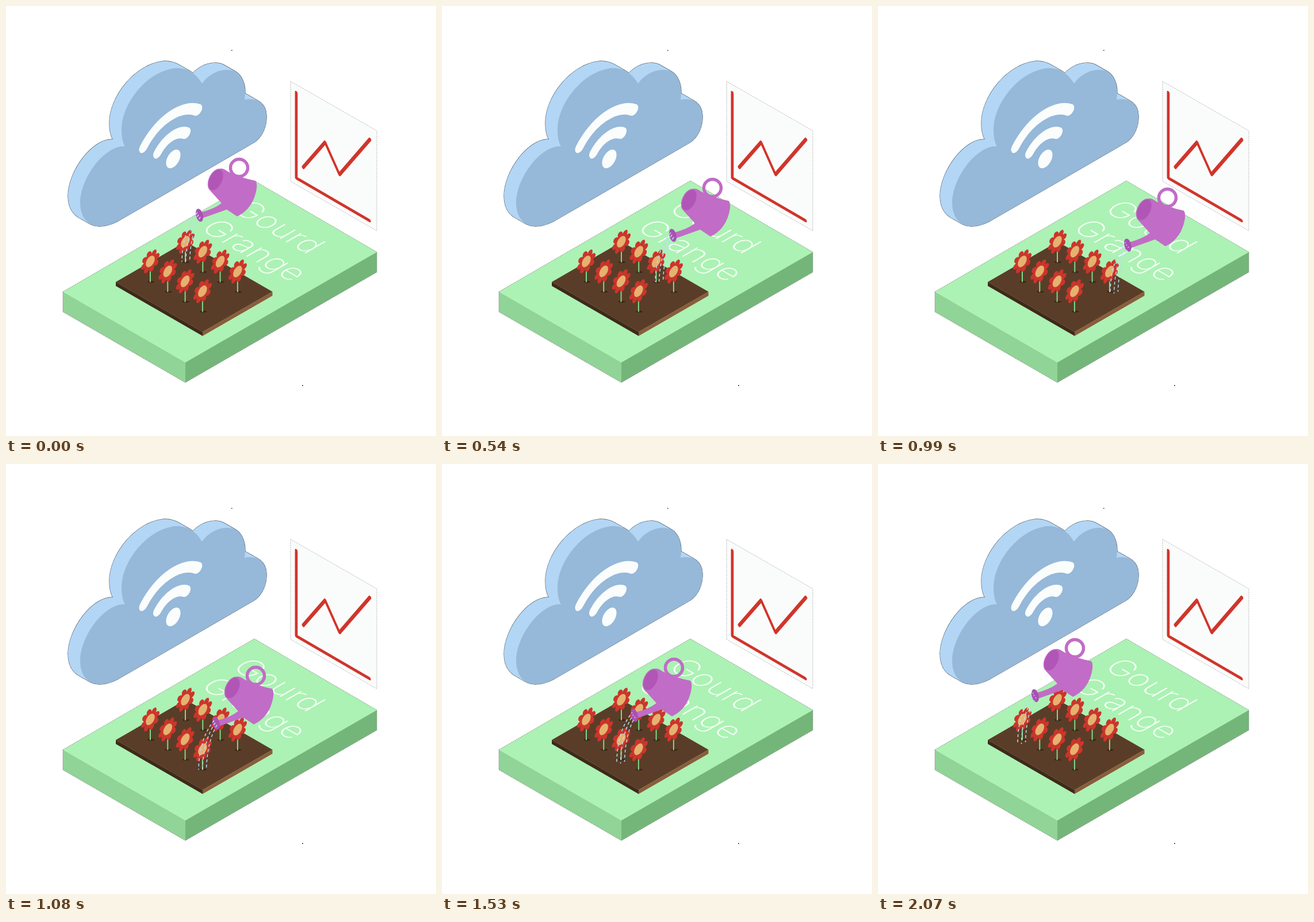
An HTML page for the animation above (2160 ms loop, 748 px wide and 748 px high).

```html
<!DOCTYPE html>
<html lang="en">
<head>
<meta charset="utf-8">
<style>
  html, body { margin: 0; width: 100%; height: 100%; overflow: hidden; background: #fff; }
  svg { display: block; width: 100vw; height: 100vh; }
  text { font: 200 55px Inter, Lato, sans-serif; fill: #f6fff7; }
  .edge { fill: none; stroke: #777; stroke-width: .8; stroke-dasharray: 2 1.5; }
  .round { fill: none; stroke-linecap: round; stroke-linejoin: round; }
</style>
</head>
<body>
<svg viewBox="0 0 748 748">
  <defs>
    <path id="puff" d="M163 383C175 383 185 379 195 374L432 237C446 227 454 209 453 190C452 172 439 158 415 163C419 136 410 111 385 111C367 111 351 121 341 135C330 115 312 107 295 108C245 113 201 170 201 215C201 228 203 238 207 244C171 242 129 300 129 342C129 366 141 383 163 383Z"/>
    <g id="flower">
      <ellipse cx="1" cy="35.500" rx="6" ry="1.600" fill="#382416"/>
      <path d="M0 10V36" stroke="#7fd985" stroke-width="2"/>
      <g id="head" transform="matrix(.866 -.5 0 1 0 0)"><circle r="11" fill="#cb352c"/></g>
    </g>
  </defs>

  <!-- lawn -->
  <path fill="#acf2b4" d="M99 497L432 304L645 428L312 620Z"/>
  <path fill="#91d497" d="M99 497L312 620V655L99 532Z"/>
  <path fill="#74b679" d="M312 620L645 428V463L312 655Z"/>
  <path class="edge" d="M99 497L432 304L645 428V463L312 655L99 532Z"/>
  <text transform="matrix(.866 .5 -.866 .5 391 355)">Gourd</text>
  <text transform="matrix(.866 .5 -.866 .5 336 388)">Grange</text>

  <!-- flower bed -->
  <path fill="#5a3d28" d="M191 480L312.500 410L463.500 497L342 567Z"/>
  <path fill="#3f291b" d="M191 480L342 567V574L191 487Z"/>
  <path fill="#8a5d3c" d="M342 567L463.500 497V504L342 574Z"/>

  <!-- cloud -->
  <g id="rim" stroke="#55636f" stroke-width="1.400"></g>
  <g id="side" fill="#b3d6f5"></g>
  <use href="#puff" fill="#96b8d9"/>
  <g transform="matrix(.866 -.5 0 1 291 266)" class="round" stroke="#fafdfc" stroke-width="18">
    <circle r="14.500" fill="#fafdfc" stroke="none"/>
    <path id="inner"/>
    <path id="outer"/>
  </g>

  <!-- chart -->
  <path fill="#fafcfb" d="M495 131L645 217V391L495 305Z"/>
  <path class="edge" stroke-opacity=".7" d="M495 131L645 217V391L495 305Z"/>
  <g transform="matrix(.866 .5 0 1 495 131)" class="round" stroke="#d0352b" stroke-width="5.500">
    <path d="M11.500 14V162.500L158.500 163"/>
    <path d="M25.400 137L69.300 71.400L98.200 113L159.400 21.300"/>
  </g>
  <path fill="#333" d="M392 76.500h1.500v1.500h-1.500zM515 659.500h2v1.500h-2z"/>

  <g id="bed"></g>

  <g id="can">
    <circle cx="405.500" cy="281.500" r="15" fill="none" stroke="#c16cc6" stroke-width="5.500"/>
    <path fill="#c16cc6" d="M372 283Q378 282 386 288Q408 299 434 304Q439 311 433 330Q425 355 402 366L384 354L342 369L339 359Q362 353 375 343L355 321Z"/>
    <ellipse fill="#b156b6" stroke="#c16cc6" stroke-width="1.500" rx="11.500" ry="20" transform="translate(365 302.500) rotate(25)"/>
    <ellipse fill="#a951b2" rx="6" ry="11.500" transform="translate(336.500 364) rotate(-14)"/>
    <g id="water" fill="none" stroke="#b9dbf5" stroke-width="1.500" stroke-dasharray="5 4">
      <path d="M333 359Q307 391 306 445"/>
      <path d="M335 363Q314 394 312.500 448"/>
      <path d="M338 367Q321 395 319.500 445"/>
    </g>
  </g>
</svg>
<script>
const $ = id => document.getElementById(id);
const repeat = (n, fn) => Array.from({ length: n }, (_, i) => fn(i)).join('');

const depth = repeat(23, i => `<use href="#puff" x="${-21 + i * 21 / 22}" y="${-12 + i * 12 / 22}"/>`);
$('rim').innerHTML = $('side').innerHTML = depth;

const polar = (r, deg) => [r * Math.cos(deg * Math.PI / 180), r * Math.sin(deg * Math.PI / 180)];
const arc = r => `M${polar(r, -140)}A${r} ${r} 0 0 1 ${polar(r, -51)}`;
$('inner').setAttribute('d', arc(41));
$('outer').setAttribute('d', arc(78));

$('head').innerHTML += repeat(8, i =>
  `<ellipse cx="12.500" rx="6.300" ry="5" fill="#cb352c" transform="rotate(${45 * i - 10})"/>`) +
  '<circle r="9" fill="#e5b26f"/>';
$('bed').innerHTML = repeat(8, i => {
  const row = i >> 2, col = i % 4;
  return `<use href="#flower" x="${312 + 30.3 * col - 61 * row}" y="${410 + 17.3 * col + 34.3 * row}"/>`;
});

// Where the can stands for each flower, along the back row and back along the front one
const stops = [[0, 0], [32, 17], [65, 35], [98, 52], [29, 87], [-2, 73], [-32, 59], [-63, 39]];
const FRAME = 90, HOLD = 3;

function draw() {
  const frame = Math.floor(performance.now() % 2160 / FRAME);
  $('can').setAttribute('transform', `translate(${stops[Math.floor(frame / HOLD)]})`);
  $('water').setAttribute('stroke-dashoffset', -3 * (frame % HOLD));
  requestAnimationFrame(draw);
}
draw();
</script>
</body>
</html>
```
